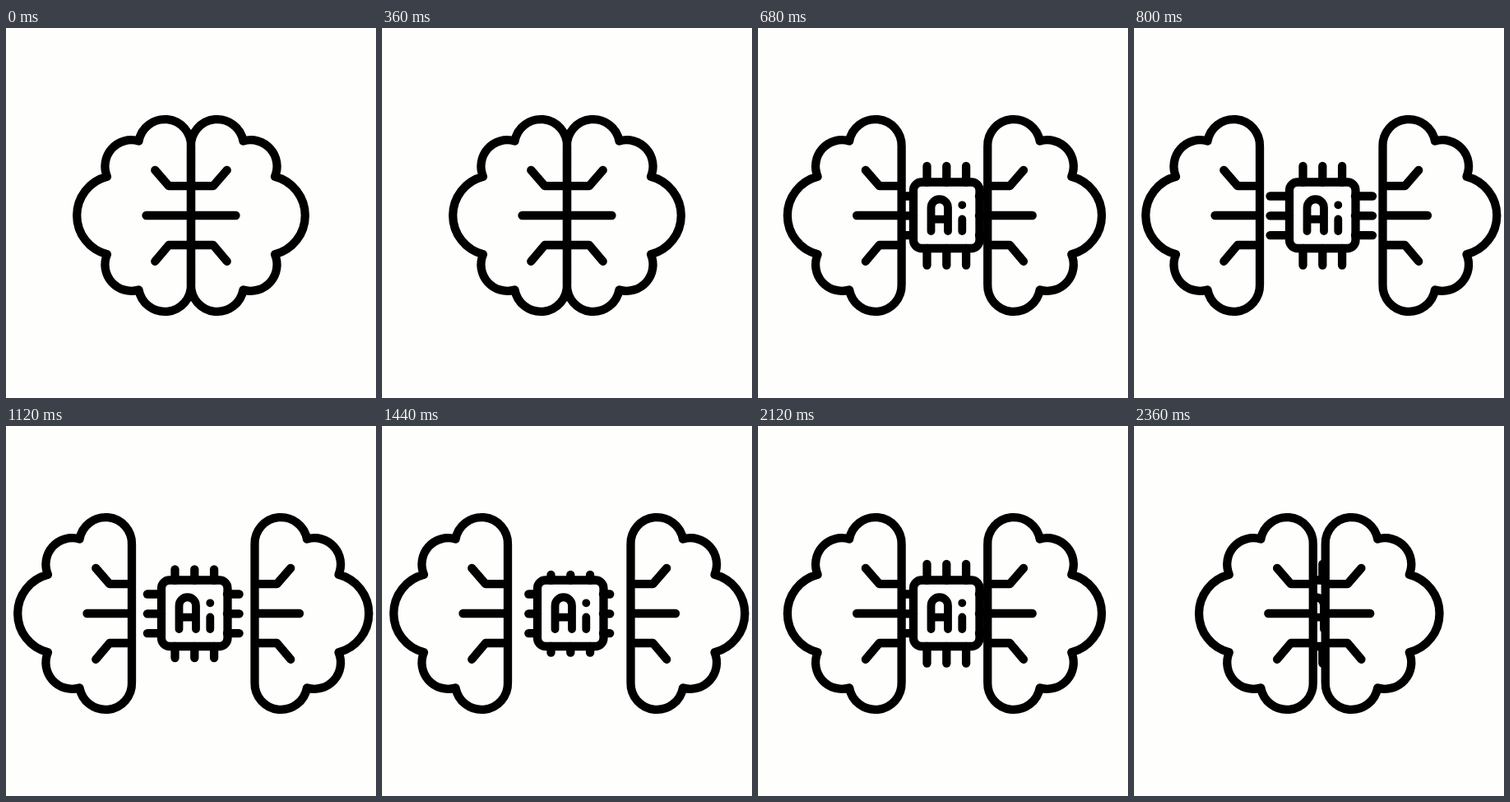
These frames come from a looping animation (450x450 px, 2400 ms). An HTML page with a canvas:

```html
<!DOCTYPE html>
<html lang="en">
<head>
<meta charset="utf-8">
<title>AI brain</title>
<style>
  html, body { margin: 0; width: 100%; height: 100%; overflow: hidden; background: #fefefc; }
  canvas { display: block; }
</style>
</head>
<body>
<canvas id="stage" width="450" height="450"></canvas>
<script>
const ctx = document.getElementById('stage').getContext('2d');
const LOOP = 2400, STEP = 40;
const CENTER = 225, SPREAD_LEFT = 72, SPREAD_RIGHT = 77.5;
const PIN_TRAVEL = 16;

// Left half of the brain, with its straight inner edge on x = 0.
const brainHalf = new Path2D(`
  M0 144
  A32 32 0 0 0 -63.5 137.5
  A32 32 0 0 0 -102 180.7
  A48.8 48.8 0 0 0 -102 275.3
  A32 32 0 0 0 -63.5 318.5
  A32 32 0 0 0 0 312 Z
  M-43.7 172.8 L-27 192.2 H0
  M-54.5 228 H0
  M-43.7 283.8 L-27 264 H0`);

const chipBody = new Path2D();
chipBody.roundRect(189, 187.5, 80.5, 80.5, 10);

const letters = new Path2D(`
  M210.5 247 V218.5 A10.2 10.2 0 0 1 231 218.5 V247
  M210.5 232.7 H231
  M248.3 232.5 V247
  M248.3 215.3 h.01`);

const clamp01 = v => Math.min(1, Math.max(0, v));

// 0 = closed, 1 = fully apart
const openness = t => clamp01((t - 400) / 400) - clamp01((t - 2000) / 400);

// Pins slide in and out three times while the brain is open.
function pinRetraction(t) {
  if (t < 800 || t > 2000) return 0;
  const phase = (t % 400) / 200;
  return PIN_TRAVEL * (1 - Math.abs(1 - phase));
}

function line(x1, y1, x2, y2) {
  ctx.beginPath();
  ctx.moveTo(x1, y1);
  ctx.lineTo(x2, y2);
  ctx.stroke();
}

function drawHalf(x, mirror) {
  ctx.save();
  ctx.translate(x, 0);
  ctx.scale(mirror, 1);
  ctx.stroke(brainHalf);
  ctx.restore();
}

function drawChip(retraction) {
  for (const offset of [-23.8, 0, 23.8]) {
    const x = 229.3 + offset, y = 228.3 + offset;
    line(x, 187.5, x, 168 + retraction);
    line(x, 268, x, 288.5 - retraction);
    line(189, y, 165.5 + retraction, y);
    line(269, y, 290 - retraction, y);
  }
  ctx.stroke(chipBody);
  ctx.lineWidth = 9.8;
  ctx.stroke(letters);
}

function draw(t) {
  ctx.fillStyle = '#fefefc';
  ctx.fillRect(0, 0, 450, 450);
  ctx.strokeStyle = '#000';
  ctx.lineWidth = 10.3;
  ctx.lineCap = ctx.lineJoin = 'round';

  const open = openness(t);
  const left = CENTER - SPREAD_LEFT * open;
  const right = CENTER + SPREAD_RIGHT * open;

  // The chip shows only in the gap between the halves.
  ctx.save();
  ctx.beginPath();
  ctx.rect(left, 0, right - left, 450);
  ctx.clip();
  drawChip(pinRetraction(t));
  ctx.restore();

  drawHalf(left, 1);
  drawHalf(right, -1);
}

const start = performance.now();
function tick() {
  const t = (performance.now() - start) % LOOP;
  draw(Math.floor(t / STEP) * STEP);
  requestAnimationFrame(tick);
}
tick();
</script>
</body>
</html>
```
